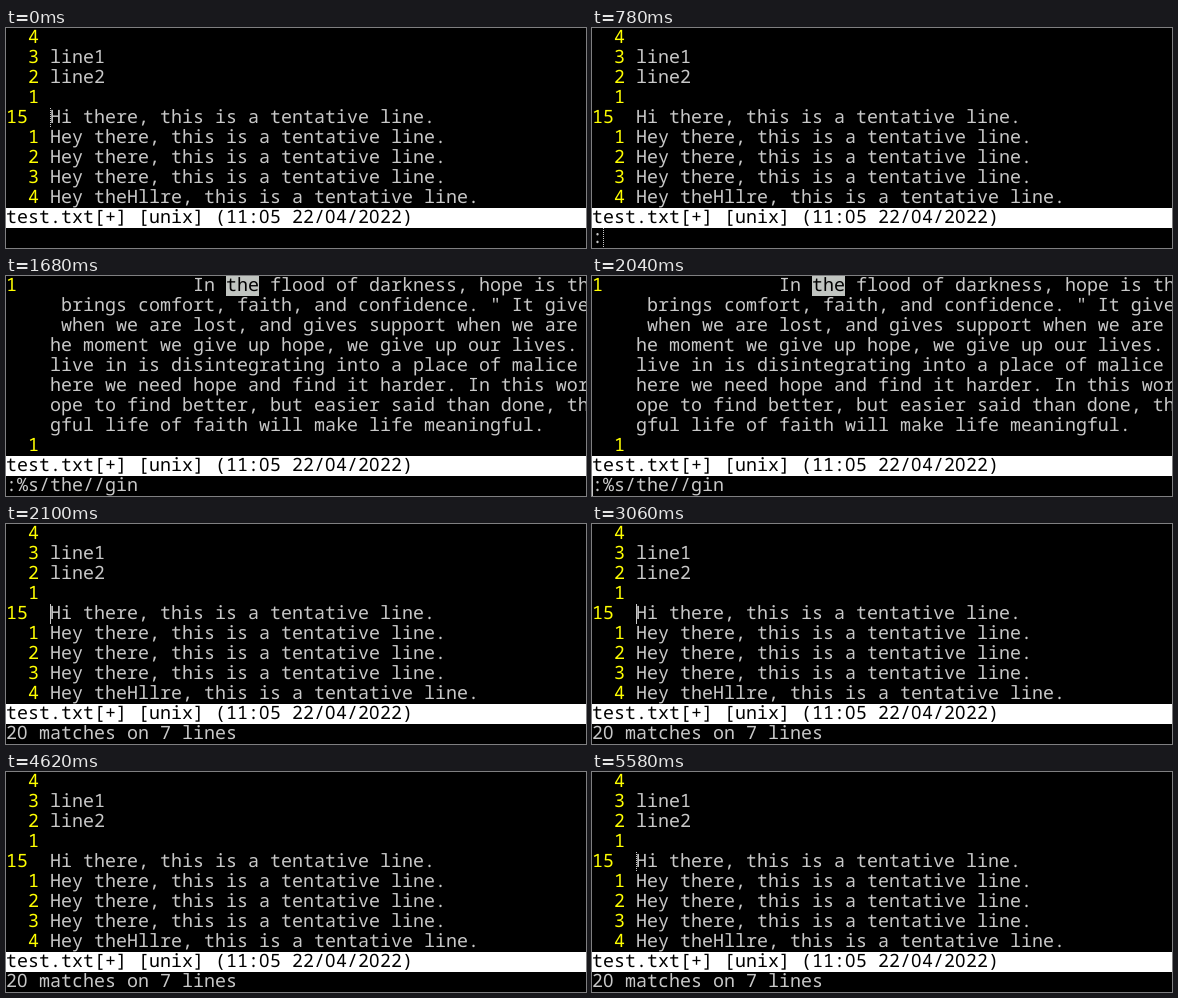
Animation, 580 px wide and 220 px high, one loop 5.64 s. Source, as an HTML page:

```html
<!DOCTYPE html>
<html lang="en">
<head>
<meta charset="utf-8">
<title>Counting matches in the editor</title>
<style>
  html, body { margin: 0; width: 100%; height: 100%; overflow: hidden; background: #000; }
  svg { display: block; width: 580px; height: 220px; }
  text {
    font: 500 18.333px "Noto Sans Mono", "DejaVu Sans Mono", monospace;
    font-variant-ligatures: none;
    text-rendering: geometricPrecision;
    white-space: pre;
  }
  /* plain zero, padded to the width of one cell */
  .zero { font-family: "Noto Sans", sans-serif; font-weight: 400; letter-spacing: .028em; }
</style>
</head>
<body>
<svg viewBox="0 0 580 220">
  <rect width="580" height="220" fill="#000"/>
  <g id="lines"></g>
  <g id="prose"></g>
  <g id="status"></g>
  <g id="command"></g>
  <path id="cursor" stroke="#c8c8c8"/>
</svg>
<script>
const CELL = 11, ROW = 20, LOOP = 5640;
const GRAY = "#c8c8c8", YELLOW = "#ffff00", HIGHLIGHT = "#c0c4c0";
const $ = id => document.getElementById(id);

const put = (col, row, str, fill = GRAY) =>
  `<text x="${col * CELL}" y="${row * ROW + 15}" fill="${fill}">` +
  str.replace(/0/g, '<tspan class="zero">0</tspan>') + "</text>";
const bar = (col, row, cells, fill) =>
  `<rect x="${col * CELL}" y="${row * ROW}" width="${cells * CELL}" height="${ROW}" fill="${fill}"/>`;

const hey = "Hey there, this is a tentative line.";
const buffer = ["", "line1", "line2", "", "Hi there, this is a tentative line.",
  hey, hey, hey, "Hey theHllre, this is a tentative line."];
$("lines").innerHTML = buffer.map((str, row) => {
  const distance = Math.abs(row - 4);
  const number = distance ? put(2, row, String(distance), YELLOW) : put(0, row, "15", YELLOW);
  return number + put(4, row, str);
}).join("");

const paragraph = [
  [5, 'brings comfort, faith, and confidence. " It gives'],
  [5, "when we are lost, and gives support when we are"],
  [4, "he moment we give up hope, we give up our lives."],
  [4, "live in is disintegrating into a place of malice"],
  [4, "here we need hope and find it harder. In this wor"],
  [4, "ope to find better, but easier said than done, th"],
  [4, "gful life of faith will make life meaningful."]
];
$("prose").innerHTML =
  put(0, 0, "1", YELLOW) + put(17, 0, "In") +
  bar(20, 0, 3, HIGHLIGHT) + put(20, 0, "the", "#000") +
  put(24, 0, "flood of darkness, hope is the") +
  paragraph.map(([col, str], i) => put(col, i + 1, str)).join("") +
  put(2, 8, "1", YELLOW);

$("status").innerHTML = bar(0, 9, 53, "#fff") +
  put(0, 9, "test.txt[+] [unix] (11:05 22/04/2022)", "#000");

// start time, visible screen, command row
const scenes = [
  [0, "lines", ""],
  [780, "lines", ":"],
  [1200, "prose", ":%s/the//gin"],
  [2100, "lines", "20 matches on 7 lines"]
];

// start time, column, row, dash pattern; no column means hidden
const blinks = [
  [0, 4, 4, "1"], [240, 4, 4, "none"], [780, 1, 10, "1"],
  [1200, 12, 10, "none"], [1680], [2040, 0, 10, "none"],
  [2100, 4, 4, "none"], [2580], [3060, 4, 4, "none"], [3600],
  [4080, 4, 4, "none"], [4620], [5100, 4, 4, "none"], [5580, 4, 4, "1"]
];

const current = (steps, t) => steps.filter(step => step[0] <= t).pop();
const show = (id, on) => $(id).setAttribute("visibility", on ? "visible" : "hidden");
let shownCommand = null;

function render(t) {
  const [, screen, command] = current(scenes, t);
  show("lines", screen === "lines");
  show("prose", screen === "prose");
  if (command !== shownCommand) {
    $("command").innerHTML = put(0, 10, command);
    shownCommand = command;
  }

  const [, col, row, dash] = current(blinks, t);
  const visible = col !== undefined;
  show("cursor", visible);
  if (visible) {
    $("cursor").setAttribute("d", `M${col * CELL + .5} ${row * ROW}v${ROW}`);
    $("cursor").setAttribute("stroke-dasharray", dash);
  }
}

const start = performance.now();
function tick() {
  render((performance.now() - start) % LOOP);
  requestAnimationFrame(tick);
}
tick();
</script>
</body>
</html>
```
